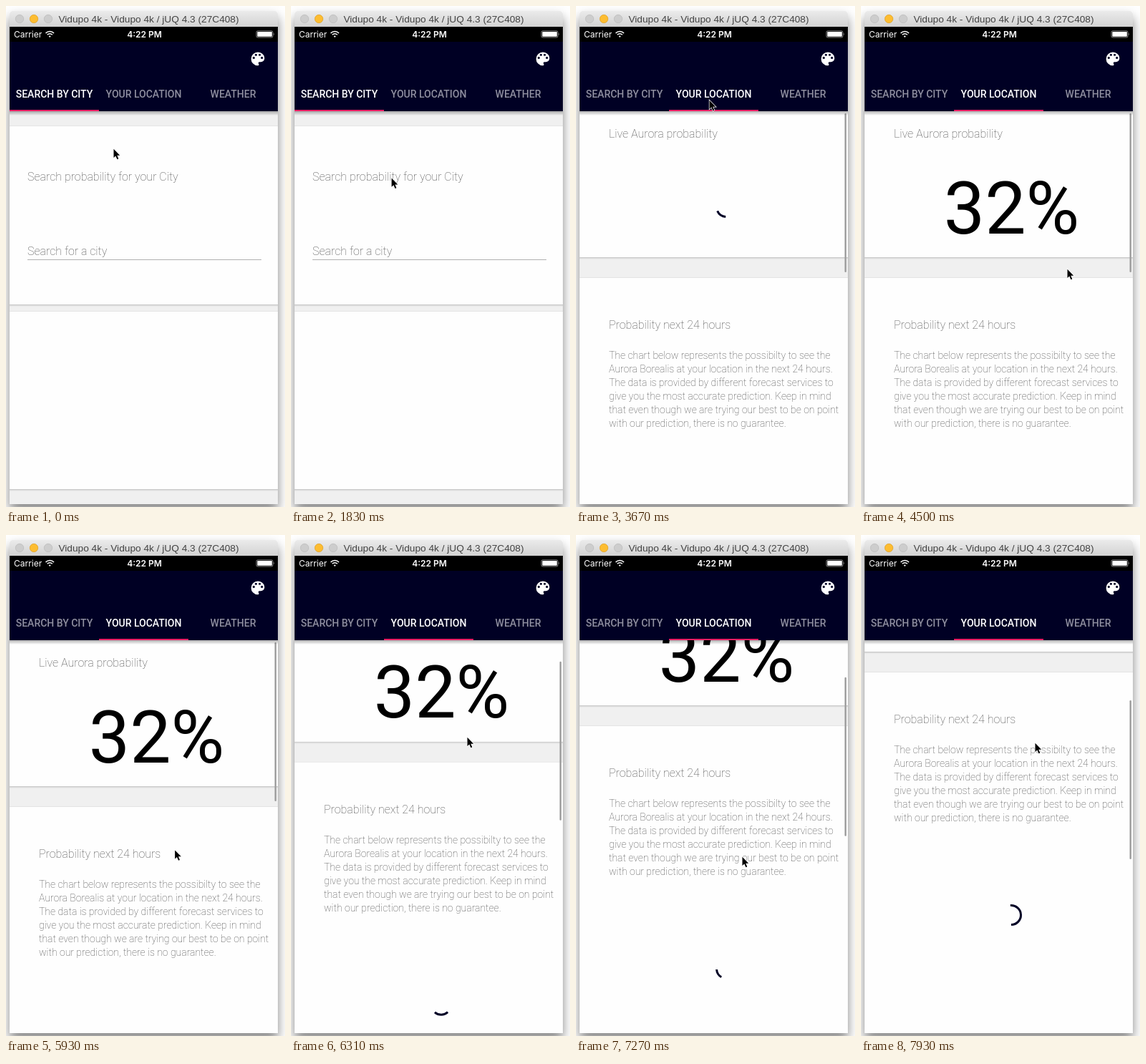
An HTML page for the animation above (8000 ms loop, 390 by 700 pixels).

```html
<!DOCTYPE html>
<html lang="en">
<head>
<meta charset="utf-8">
<title>Aurora probability</title>
<style>
html, body { margin: 0; width: 100%; height: 100%; overflow: hidden; background: #fff; }
svg { display: block; width: 390px; height: 700px; font-family: Roboto, sans-serif; }
.thin { font-weight: 100; fill: #4a4a4a; }
.h { font-size: 16px; }
.body { font-size: 14px; }
.tab { font-size: 14px; font-weight: 500; fill: #fff; text-anchor: middle; }
.bar { font-family: Inter, sans-serif; font-size: 12px; fill: #fff; }
.arc { fill: none; stroke: #000026; stroke-width: 3; }
</style>
</head>
<body>
<svg viewBox="0 0 390 700">
  <defs>
    <linearGradient id="chrome" x2="0" y2="1">
      <stop stop-color="#ebebeb"/><stop offset="1" stop-color="#d2d2d2"/>
    </linearGradient>
    <linearGradient id="fade" x2="0" y2="1">
      <stop stop-opacity=".3"/><stop offset="1" stop-opacity="0"/>
    </linearGradient>
    <filter id="drop" x="-20%" y="-10%" width="140%" height="120%">
      <feDropShadow dx="0" dy="9" stdDeviation="8" flood-opacity=".48"/>
    </filter>
    <clipPath id="view"><rect x="5" y="147" width="375" height="549"/></clipPath>
  </defs>

  <path d="M5 696V12a5 5 0 0 1 5-5H375a5 5 0 0 1 5 5V696Z" fill="#f0f0f0" filter="url(#drop)"/>
  <path d="M5 29V12a5 5 0 0 1 5-5H375a5 5 0 0 1 5 5V29Z" fill="url(#chrome)"/>
  <g stroke-width=".8">
    <circle cx="19" cy="18" r="5.7" fill="#cdcdcd" stroke="#bdbdbd"/>
    <circle cx="39" cy="18" r="5.7" fill="#fdbd31" stroke="#e0a32b"/>
    <circle cx="59" cy="18" r="5.7" fill="#cdcdcd" stroke="#bdbdbd"/>
  </g>
  <text x="199.5" y="23" text-anchor="middle" font-family="Liberation Sans, sans-serif" font-size="13.7" fill="#444">Vidupo 4k - Vidupo 4k / jUQ 4.3 (27C408)</text>

  <g clip-path="url(#view)">
    <g id="search">
      <g class="card" data-y="168" data-h="249"></g>
      <g class="card" data-y="427" data-h="248"></g>
      <text class="thin h" x="30" y="244">Search probability for your City</text>
      <text class="thin h" x="30" y="348">Search for a city</text>
      <path d="M30 354.5H357" stroke="#b0b0b0"/>
    </g>
    <g id="place">
      <g id="scroll">
        <g class="card" data-y="100" data-h="251"></g>
        <g class="card" data-y="380" data-h="560"></g>
        <text class="thin h" x="46" y="184">Live Aurora probability</text>
        <rect id="box" x="193.5" y="264.5" width="33" height="33"/>
        <path id="spin1" class="arc"/>
        <text id="value" x="210.5" y="317.5" font-size="102" text-anchor="middle">32%</text>
        <text class="thin h" x="46" y="451">Probability next 24 hours</text>
        <text id="about" class="thin body" y="474"></text>
        <path id="spin2" class="arc"/>
      </g>
      <rect id="thumb" x="375.5" width="2.5" height="222" rx="1.25" fill="#a0a0a0"/>
    </g>
    <rect x="5" y="147" width="375" height="6" fill="url(#fade)"/>
  </g>

  <rect x="5" y="29" width="375" height="21"/>
  <rect x="5" y="50" width="375" height="97" fill="#000024"/>
  <text class="bar" x="11" y="43.5">Carrier</text>
  <text class="bar" x="193.5" y="43.5" text-anchor="middle" font-weight="600">4:22 PM</text>
  <g fill="none" stroke="#fff" stroke-width="1.6">
    <path d="M55.5 38a8 8 0 0 1 11.5 0M57.7 40.3a5 5 0 0 1 7.1 0"/>
    <path d="M61.2 44l-1.5-1.7a2.2 2.2 0 0 1 3 0Z" fill="#fff" stroke="none"/>
  </g>
  <rect x="350" y="34.8" width="23" height="9.2" rx="2" fill="none" stroke="#fff" stroke-opacity=".5"/>
  <rect x="351.3" y="36" width="20.5" height="6.8" rx=".8" fill="#fff"/>
  <path d="M374.3 37.8q1.8 1.6 0 3.2Z" fill="#fff" fill-opacity=".6"/>
  <path transform="translate(339.5 61.5) scale(1.04)" fill="#fff" d="M12 3a9 9 0 0 0 0 18c.83 0 1.5-.67 1.5-1.5 0-.39-.15-.74-.39-1.01-.23-.26-.38-.61-.38-.99 0-.83.67-1.5 1.5-1.5H16c2.76 0 5-2.24 5-5 0-4.42-4.03-8-9-8z"/>
  <g fill="#000024">
    <circle cx="346.3" cy="72.4" r="1.56"/><circle cx="349.4" cy="68.3" r="1.56"/>
    <circle cx="354.6" cy="68.3" r="1.56"/><circle cx="357.7" cy="72.4" r="1.56"/>
  </g>
  <text id="tab1" class="tab" x="67.5" y="127.6">SEARCH BY CITY</text>
  <text id="tab2" class="tab" x="192.5" y="127.6">YOUR LOCATION</text>
  <text class="tab" x="317.5" y="127.6" opacity=".56">WEATHER</text>
  <rect id="mark" y="145" width="125" height="2" fill="#e91e63"/>

  <path id="cursor" d="M.5 .8V13L3.3 10.4L5.4 15.2L7.3 14.4L5.3 9.7H9.2Z" stroke="#fff" stroke-width="1.4" paint-order="stroke"/>
</svg>
<script>
const LOOP = 8000;
const $ = id => document.getElementById(id);
const set = (id, name, v) => $(id).setAttribute(name, v);
const show = (id, on) => set(id, 'visibility', on ? 'inherit' : 'hidden');
const linear = u => u;
const smooth = u => u * u * (3 - 2 * u);

// Keys are [time, ...values]; values hold before the first and after the last key.
function track(keys, t, ease) {
  const i = keys.findIndex(k => k[0] > t);
  if (i === 0) return keys[0].slice(1);
  if (i < 0) return keys[keys.length - 1].slice(1);
  const a = keys[i - 1], b = keys[i];
  const u = ease((t - a[0]) / (b[0] - a[0]));
  return a.slice(1).map((v, j) => v + (b[j + 1] - v) * u);
}

const POINTER = [
  [110, 150, 199], [210, 140, 240], [1820, 140, 240], [2220, 186, 131],
  [3770, 186, 131], [4120, 258, 275], [4300, 258, 275], [4500, 288, 367],
  [4910, 288, 367], [5400, 233, 480], [5780, 233, 480], [6300, 246, 282],
  [6600, 246, 282], [7260, 232, 449], [7430, 232, 449], [7920, 243, 290]
];
const SCROLL = [[5970, 0], [6310, 62], [6550, 113], [7490, 113], [7930, 188]];
const MARK = [[3090, 5], [3490, 130]];

// Arc whose sweep swells and shrinks while it turns.
function arc(cx, cy, t) {
  const d = t - 7270, ph = 2 * Math.PI * (d / 1280 - .08);
  const s = Math.sin(ph), c = Math.cos(ph);
  const mid = 210 + .4 * d - 19 * s + 21 * c;
  const sweep = 119 - 72 * c;
  const at = deg => {
    const a = deg * Math.PI / 180;
    return `${(cx + 13.5 * Math.sin(a)).toFixed(2)} ${(cy - 13.5 * Math.cos(a)).toFixed(2)}`;
  };
  return `M${at(mid - sweep / 2)}A13.5 13.5 0 ${sweep > 180 ? 1 : 0} 1 ${at(mid + sweep / 2)}`;
}

for (const g of document.querySelectorAll('.card')) {
  const y = +g.dataset.y, h = +g.dataset.h;
  const strip = (top, size, alpha) =>
    `<rect x="5" y="${top}" width="375" height="${size}" fill-opacity="${alpha}"/>`;
  g.innerHTML = strip(y - 1, 1, .05) + strip(y + h, 1, .16) + strip(y + h + 1, 1, .08) +
    strip(y + h + 2, 1, .03) +
    `<rect x="5" y="${y}" width="375" height="${h}" fill="#fefefe"/>`;
}

$('about').innerHTML = [
  'The chart below represents the possibilty to see the',
  'Aurora Borealis at your location in the next 24 hours.',
  'The data is provided by different forecast services to',
  'give you the most accurate prediction. Keep in mind',
  'that even though we are trying our best to be on point',
  'with our prediction, there is no guarantee.'
].map(s => `<tspan x="46" dy="19">${s}</tspan>`).join('');

function draw(t) {
  const [y] = track(SCROLL, t, linear);
  const second = t >= 2870, picked = t >= 3110, loaded = t >= 4330;
  show('search', !second);
  show('place', second);
  show('box', second && !picked);
  show('spin1', picked && !loaded);
  show('value', loaded);
  set('scroll', 'transform', `translate(0 ${-y})`);
  set('thumb', 'y', 150 + .431 * y);
  set('spin1', 'd', arc(210, 281, t));
  set('spin2', 'd', arc(210, 719, t));
  set('tab1', 'opacity', picked ? .56 : 1);
  set('tab2', 'opacity', picked ? 1 : .56);
  set('mark', 'x', track(MARK, t, smooth)[0]);
  set('cursor', 'transform', `translate(${track(POINTER, t, smooth).join(' ')})`);
}

const start = performance.now();
function tick() {
  draw((performance.now() - start) % LOOP);
  requestAnimationFrame(tick);
}
tick();
</script>
</body>
</html>
```
